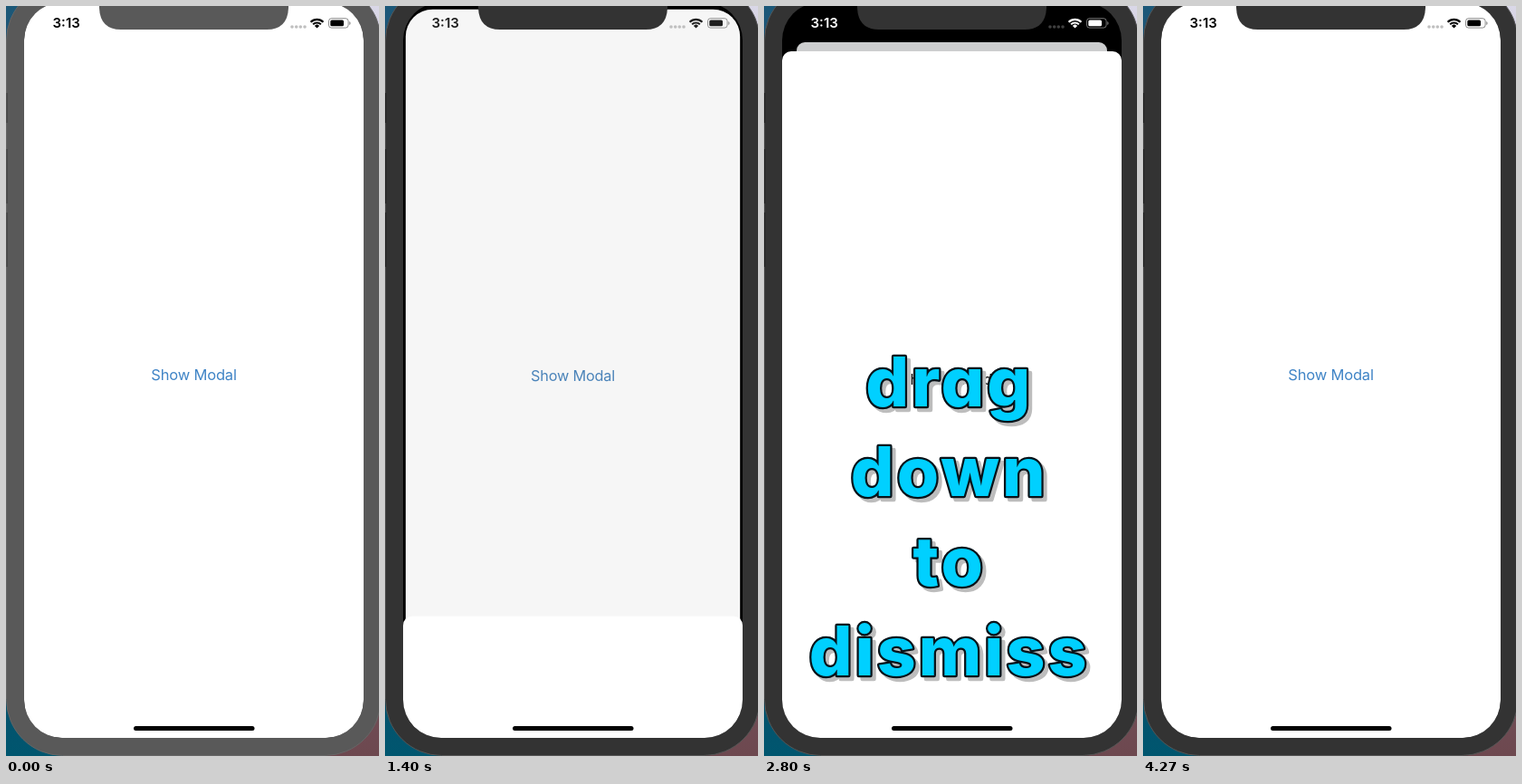
Recreate the animation shown at these times as an HTML page. Size 412x828 px, loop 5250 ms.

```html
<!DOCTYPE html>
<html lang="en">
<head>
<meta charset="utf-8">
<title>Modal demo</title>
<style>
  html, body { margin: 0; width: 100%; height: 100%; overflow: hidden; background: #fff; }
  svg { display: block; width: 412px; height: 828px; }
  text { font-family: Inter, "Open Sans", sans-serif; text-anchor: middle; }
  .label { font-size: 16.5px; letter-spacing: -0.18px; }
  .clock { font-size: 15px; font-weight: 600; }
  .caption text {
    font-size: 75px; font-weight: 800; letter-spacing: 3px;
    font-feature-settings: "cv11";
    stroke-linejoin: round; paint-order: stroke;
  }
</style>
</head>
<body>
<svg viewBox="0 0 412 828">
  <defs>
    <linearGradient id="cool" x2="0" y2="1">
      <stop offset="0" stop-color="#1b5878"/>
      <stop offset=".3" stop-color="#3b4474"/>
      <stop offset=".8" stop-color="#0d4c69"/>
      <stop offset="1" stop-color="#00566f"/>
    </linearGradient>
    <linearGradient id="warm" x2="0" y2="1">
      <stop offset="0" stop-color="#dad8e8"/>
      <stop offset=".4" stop-color="#8a7488"/>
      <stop offset="1" stop-color="#6d484f"/>
    </linearGradient>
    <clipPath id="screen"><rect x="20" y="-4" width="375" height="812" rx="42"/></clipPath>
  </defs>

  <rect width="206" height="828" fill="url(#cool)"/>
  <rect x="206" width="206" height="828" fill="url(#warm)"/>
  <rect id="body" x=".5" y="-24" width="413.5" height="851.5" rx="62"/>
  <g id="keys" fill="#2a2a2a">
    <rect y="96" width="2" height="33"/>
    <rect y="158" width="2" height="60"/>
    <rect y="228" width="2" height="60"/>
  </g>

  <g clip-path="url(#screen)">
    <rect x="20" y="-4" width="375" height="812"/>
    <g id="card">
      <rect id="page" width="375" height="812"/>
      <text id="button" class="label" x="187.5" y="417">Show Modal</text>
    </g>
    <g id="modal">
      <rect x="20" width="375" height="830" rx="10" fill="#fff"/>
      <text class="label" x="208" y="368.3">This is a modal</text>
    </g>
    <g id="status">
      <text class="clock" x="66.7" y="24.3">3:13</text>
      <g opacity=".25">
        <circle cx="316" cy="23" r="1.8"/><circle cx="320.7" cy="23" r="1.8"/>
        <circle cx="325.3" cy="23" r="1.8"/><circle cx="330" cy="23" r="1.8"/>
      </g>
      <g id="wifi" fill="none" stroke="currentColor" stroke-width="2.2"></g>
      <path d="M343.5 24.6l-2.6-2.7a3.7 3.7 0 0 1 5.2 0z"/>
      <rect x="356.5" y="13.7" width="21.6" height="10.4" rx="3" fill="none" stroke="currentColor" opacity=".45"/>
      <rect x="358.3" y="15.5" width="14.7" height="6.8" rx="1.5"/>
      <path d="M379.3 17a2.2 2.2 0 0 1 0 4z" opacity=".5"/>
    </g>
    <rect x="141" y="795" width="133.5" height="5" rx="2.5"/>
  </g>
  <path id="notch" d="M103 -5V2Q104 26 127 26H288Q311 26 312 2V-5z"/>
  <g id="caption" class="caption"></g>
</svg>
<script>
  const LOOP = 5250, STEP = 70;
  const PRESS = 1260, PRESENT = 1365, DRAG = 2800;
  const CAPTION_IN = 1785, CAPTION_FULL = 2660, CAPTION_OUT = 3500;
  const OPEN = 50, CLOSED = 808;
  // Sheet top at each step of the drag and the release.
  const dragTops = [50, 62, 100, 165, 247, 337, 432, 540, 636, 705, 752, 780, 796, 804, 808];

  const $ = id => document.getElementById(id);
  const set = (el, attrs) => { for (const k in attrs) el.setAttribute(k, attrs[k]); };
  const clamp = v => Math.min(1, Math.max(0, v));
  const span = (t, a, b) => clamp((t - a) / (b - a));
  const mix = (a, b, p) => a + (b - a) * p;
  const rgb = (a, b, p) => `rgb(${a.map((v, i) => Math.round(mix(v, b[i], p)))})`;

  function add(parent, tag, attrs, text = "") {
    const el = document.createElementNS("http://www.w3.org/2000/svg", tag);
    set(el, attrs);
    el.textContent = text;
    parent.append(el);
  }

  for (const r of [9.9, 6.2]) {
    const d = r * 0.7;
    add($("wifi"), "path", { d: `M${343.5 - d} ${24.6 - d}A${r} ${r} 0 0 1 ${343.5 + d} ${24.6 - d}` });
  }

  const layers = [
    { shift: 4, fill: "#bdbdbd", stroke: "#bdbdbd" },
    { shift: 0, fill: "#00d0ff", stroke: "#08131a" }
  ];
  for (const { shift, fill, stroke } of layers) {
    ["drag", "down", "to", "dismiss"].forEach((word, i) =>
      add($("caption"), "text", {
        x: 204.7 + shift, y: 442 + i * 99 + shift, fill, stroke, "stroke-width": 4.5
      }, word));
  }

  // Ease-out curve of the sheet: cubic-bezier(.32, .72, 0, 1).
  function sheetEase(x) {
    const curve = (s, a, b) => 3 * (1 - s) ** 2 * s * a + 3 * (1 - s) * s * s * b + s ** 3;
    let lo = 0, hi = 1;
    for (let i = 0; i < 24; i++) {
      const mid = (lo + hi) / 2;
      if (curve(mid, 0.32, 0) < x) lo = mid; else hi = mid;
    }
    return curve(lo, 0.72, 1);
  }

  function sheetTop(t) {
    if (t < DRAG) return mix(CLOSED, OPEN, t < PRESENT ? 0 : sheetEase(span(t, PRESENT, PRESENT + 500)));
    return dragTops[Math.min(dragTops.length - 1, Math.floor((t - DRAG) / STEP))];
  }

  function draw(t) {
    const top = sheetTop(t);
    const open = (CLOSED - top) / (CLOSED - OPEN);
    const back = t < DRAG ? open : open ** 0.87;
    const focused = t >= PRESS;

    const shell = focused ? "#333" : "#595959";
    set($("body"), { fill: shell, stroke: focused ? "#555" : "#666" });
    set($("notch"), { fill: shell });
    set($("keys"), { opacity: focused ? 0.8 : 0.35 });

    const scale = (375 - 32 * back) / 375;
    set($("card"), { transform: `translate(${20 + 16 * back} ${-4 + 44 * back}) scale(${scale})` });
    set($("page"), {
      rx: 10 + 30 * (1 - back) ** 2,
      fill: rgb([255, 255, 255], [205, 206, 207], open)
    });
    const pressed = t >= PRESS && t < PRESENT;
    set($("button"), {
      fill: pressed ? "#8ab7dd" : rgb([63, 132, 198], [125, 125, 125], open)
    });
    set($("modal"), { transform: `translate(0 ${top})` });

    const light = span(t, PRESENT, 1655) - span(t, 3360, 3640);
    const ink = rgb([0, 0, 0], [255, 255, 255], light);
    set($("status"), { fill: ink, color: ink });

    const shown = t > CAPTION_IN && t < CAPTION_OUT;
    const grow = span(t, CAPTION_IN, CAPTION_FULL);
    set($("caption"), {
      visibility: shown ? "visible" : "hidden",
      transform: `translate(203 564) scale(${grow}) translate(-203 -564)`
    });
  }

  const start = performance.now();
  function tick() {
    const t = (performance.now() - start) % LOOP;
    draw(Math.floor(t / STEP) * STEP);
    requestAnimationFrame(tick);
  }
  tick();
</script>
</body>
</html>
```
